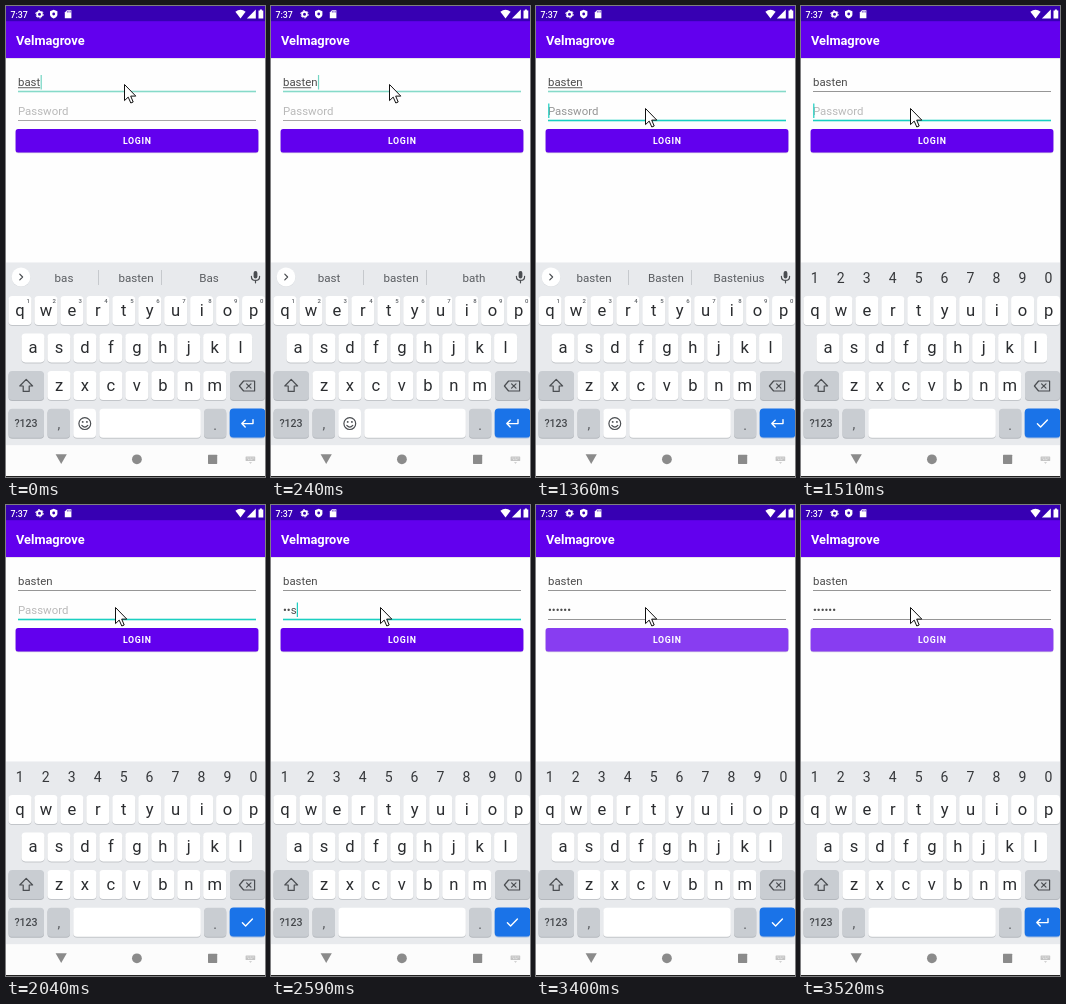
These frames come from a looping animation (259 by 471 pixels, 8 s). An HTML page:

```html
<!DOCTYPE html>
<html lang="en">
<head>
<meta charset="utf-8">
<title>Login screen</title>
<style>
  html, body { margin: 0; width: 100%; height: 100%; overflow: hidden; background: #fefefe; }
  svg { display: block; width: 259px; height: 471px; font-family: Roboto, "Liberation Sans", sans-serif; }
  text { white-space: pre; }
  .field { font-size: 11.4px; fill: #4c4c4c; }
  .word { font-size: 11.6px; fill: #5a5d61; text-anchor: middle; }
  .letter { font-size: 16.6px; fill: #2b2d30; text-anchor: middle; }
  .digit { font-size: 14px; fill: #36383b; text-anchor: middle; }
  .sup { font-size: 6px; font-weight: 500; fill: #5f6368; text-anchor: middle; }
  .dot { font-size: 14px; fill: #55585c; text-anchor: middle; }
  .icon { fill: none; stroke: #4a4d51; stroke-width: 1.2; stroke-linejoin: round; stroke-linecap: round; }
  .action { stroke: #fff; stroke-width: 1.4; }
</style>
</head>
<body>
<svg viewBox="0 0 259 471">
  <rect width="259" height="471" fill="#fefefe"/>

  <!-- app bar -->
  <rect y="52" width="259" height="1" fill="#e6e3ea"/>
  <rect y="15" width="259" height="37" fill="#6200ee"/>
  <rect width="259" height="15.2" fill="#3700b3"/>
  <text x="10" y="38.8" font-size="12.8" font-weight="700" fill="#fff">Velmagrove</text>

  <!-- status bar -->
  <g fill="#fff">
    <text x="4.5" y="11.6" font-size="8.8" font-weight="500">7:37</text>
    <circle cx="33.5" cy="8.2" r="2.4" fill="none" stroke="#fff" stroke-width="1.8"/>
    <circle cx="33.5" cy="8.2" r="3.7" fill="none" stroke="#fff" stroke-width="1" stroke-dasharray="1.9 1.97"/>
    <path d="M47.7 3.7l3.7 1.5v3q0 3-3.7 4.4q-3.7-1.4-3.7-4.4v-3z"/>
    <circle cx="47.7" cy="8" r="1.4" fill="#3700b3"/>
    <path d="M61 4.2h4.4v8h-6.6V6.5z"/>
    <path d="M61.4 5v1.6M62.9 5v1.6M64.3 5v1.6" stroke="#3700b3" stroke-width=".6"/>
    <path d="M229.4 5.8q5.1-4 10.2 0l-5.1 6.8z"/>
    <path d="M249.8 3.6v8.9h-8.9z"/>
    <path d="M252.5 4.6h1.4v-1h2v1h1.4v8h-4.8z"/>
  </g>

  <!-- form -->
  <rect id="userLine" x="12" width="238"/>
  <rect id="passLine" x="12" width="238"/>
  <text id="user" class="field" x="12" y="80.3"></text>
  <rect id="mark" x="12" y="81.3" height=".9" fill="#4c4c4c"/>
  <text id="pass" class="field" x="12" y="109.3"></text>
  <rect id="caret" width="1.2" height="14.5"/>
  <rect x="9.6" y="124.5" width="242.8" height="22.8" rx="2.5" fill="#d3cddd"/>
  <rect id="button" x="9.6" y="123" width="242.8" height="23.5" rx="2.5"/>
  <text x="131.3" y="138.2" font-size="8.8" font-weight="700" letter-spacing=".7" text-anchor="middle" fill="#fff">LOGIN</text>

  <!-- keyboard -->
  <rect y="256.5" width="259" height="183" fill="#e8eaed"/>
  <g id="strip">
    <circle cx="15" cy="271.6" r="9.5" fill="#d5d8dc"/>
    <circle cx="15" cy="271" r="9.4" fill="#fff"/>
    <path class="icon" d="M13.8 268.2l2.8 2.8-2.8 2.8"/>
    <path d="M92.5 264v15M155.5 264v15" stroke="#c6c9cd"/>
    <text class="word" x="58" y="275.8"></text>
    <text class="word" x="130" y="275.8"></text>
    <text class="word" x="203" y="275.8"></text>
    <rect x="247.6" y="265" width="3.8" height="7.4" rx="1.9" fill="#4a4d51"/>
    <path class="icon" d="M245.4 270.4q0 4 4.1 4t4.1-4M249.5 274.6v2.2"/>
  </g>
  <g id="digits"></g>
  <g id="keys"></g>
  <g id="sups"></g>
  <path class="icon" d="M20.2 373.4l6.4 6.6h-3.4v5.4h-6V380h-3.4z"/>
  <path class="icon" d="M233.4 380l4.2-5h11v10h-11zM240.6 377.8l4.4 4.4M245 377.8l-4.4 4.4"/>
  <text x="20" y="421.4" font-size="10.6" font-weight="500" text-anchor="middle" fill="#45484c">?123</text>
  <text class="dot" x="53" y="423">,</text>
  <text class="dot" x="209" y="423.6">.</text>
  <g id="emoji">
    <circle class="icon" cx="78.8" cy="417.6" r="5.9"/>
    <path class="icon" d="M75.8 419.4q3 3.4 6 0"/>
    <circle cx="76.7" cy="415.9" r=".95" fill="#4a4d51"/>
    <circle cx="80.9" cy="415.9" r=".95" fill="#4a4d51"/>
  </g>
  <path id="enter" class="icon action" d="M247 413.6v4h-11M239.2 414.2l-3.4 3.4 3.4 3.4"/>
  <path id="check" class="icon action" d="M236.4 417.8l3.2 3.2 6.8-7"/>

  <!-- navigation bar -->
  <rect y="439.3" width="259" height="31" fill="#fcfcfc"/>
  <rect y="470" width="259" height="1" fill="#222"/>
  <g fill="#8b8b8b">
    <path d="M49.6 448.2h11.2l-5.6 9.8z"/>
    <circle cx="130.9" cy="453.3" r="4.9"/>
    <rect x="202" y="448.7" width="9.2" height="9.2" rx=".6"/>
    <rect x="239.6" y="450.4" width="9.6" height="4.6" rx=".6" fill="#c4c4c4"/>
    <path d="M240.8 452h7.4M242 453.6h5" stroke="#fcfcfc" stroke-width=".6" stroke-dasharray="1 .6"/>
    <path d="M243 456.2h3l-1.5 1.6z" fill="#c4c4c4"/>
  </g>

  <path id="pointer" d="M.5 .5V16.6L4.2 13.1 6.8 19 9.2 18 6.7 12.1H11.8Z" fill="#fff" stroke="#111" stroke-width="1" stroke-linejoin="round"/>
</svg>
<script>
const LOOP = 8000;
const $ = id => document.getElementById(id);

function add(parent, tag, attrs, text) {
  const el = document.createElementNS("http://www.w3.org/2000/svg", tag);
  for (const k in attrs) el.setAttribute(k, attrs[k]);
  if (text) el.textContent = text;
  return parent.appendChild(el);
}

function key(x, y, w, fill = "#fff", shade = "#c3c6ca") {
  const group = add($("keys"), "g", {});
  const box = { x, width: w, height: 29, rx: 3.8 };
  add(group, "rect", { ...box, y: y + 1, fill: shade });
  add(group, "rect", { ...box, y, fill });
  return group;
}

const PITCH = 25.95, GRAY = "#c9cdd2", DARK = "#b4b8bd";
const rows = [["qwertyuiop", 14, 290], ["asdfghjkl", 27, 327.4], ["zxcvbnm", 53, 365]];
for (const [letters, x0, y] of rows) {
  [...letters].forEach((ch, i) => {
    const x = x0 + i * PITCH;
    key(x - 11.5, y, 23);
    add($("keys"), "text", { class: "letter", x, y: y + 19.6 }, ch);
  });
}
[..."1234567890"].forEach((d, i) => {
  add($("digits"), "text", { class: "digit", x: 13.8 + i * PITCH, y: 277 }, d);
  add($("sups"), "text", { class: "sup", x: 22.2 + i * PITCH, y: 297 }, d);
});
key(2.5, 365, 35.5, GRAY, DARK);
key(224, 365, 35, GRAY, DARK);
key(2.5, 402.8, 35.5, GRAY, DARK);
key(41.5, 402.8, 22.5, GRAY, DARK);
const emojiKey = key(67.3, 402.8, 22.7);
const space = key(93.3, 402.8, 101.5);
const wideSpace = key(67.3, 402.8, 127.5);
key(198, 402.8, 22.3, GRAY, DARK);
key(223.7, 402.6, 35.6, "#1a73e8", "#a9bfe0");

// Each step holds only what changes at that time.
const NAME = "basten", DOT = "\u2022";
const steps = [
  [0, { user: "bast", marked: 4, pass: "", hint: "#b9b9b9", words: ["bas", NAME, "Bas"],
        caret: "user", focus: "user", pos: [118, 78], secret: false, done: false, enter: true }],
  [120, { user: "baste", marked: 5, words: ["bast", NAME, "bath"] }],
  [240, { user: NAME }],
  [390, { words: ["baste", NAME, "Basten"] }],
  [540, { marked: 6, words: [NAME, "Basten", "Bastenius"] }],
  [940, { caret: "" }],
  [1090, { pos: [115, 88] }],
  [1240, { pos: [109, 102] }],
  [1360, { focus: "both", caret: "pass", hint: "#959595" }],
  [1510, { focus: "pass", marked: 0, hint: "#b9b9b9", secret: true, enter: false }],
  [2040, { caret: "" }],
  ...[2290, 2440, 2590, 2740, 2870, 3000].map((t, i) =>
    [t, { caret: "pass", pass: DOT.repeat(i) + NAME[i] }]),
  [3400, { pass: DOT.repeat(6), caret: "", focus: "", done: true }],
  [3520, { enter: true }]
];

const set = (el, attrs) => { for (const k in attrs) el.setAttribute(k, attrs[k]); };
const show = (el, on) => { el.style.display = on ? "" : "none"; };
const words = document.querySelectorAll(".word");

function line(el, y, focused, color, rest) {
  set(el, { y: focused ? y - .3 : y, height: focused ? 1.6 : 1, fill: focused ? color : rest });
}

function draw(t) {
  const s = Object.assign({}, ...steps.filter(([at]) => at <= t).map(step => step[1]));
  const user = $("user"), pass = $("pass"), caret = $("caret");

  user.textContent = s.user;
  pass.textContent = s.pass || "Password";
  pass.style.fill = s.pass ? "" : s.hint;
  show($("mark"), s.marked);
  if (s.marked) set($("mark"), { width: user.getSubStringLength(0, s.marked) });

  line($("userLine"), 85, s.focus === "user" || s.focus === "both", "#86dac9", "#969696");
  line($("passLine"), 114, s.focus === "pass" || s.focus === "both", "#1bcfc1", s.done ? "#969696" : "#a6a6a6");

  show(caret, s.caret);
  if (s.caret === "user") {
    set(caret, { x: 12.4 + user.getComputedTextLength(), y: 69, fill: "#74d5c3" });
  } else if (s.caret) {
    set(caret, { x: 12.2 + (s.pass ? pass.getComputedTextLength() : 0), y: 97.5, fill: "#1bcfc1" });
  }

  words.forEach((el, i) => { el.textContent = s.words[i]; });
  for (const el of [$("strip"), $("sups"), $("emoji"), emojiKey, space]) show(el, !s.secret);
  for (const el of [$("digits"), wideSpace]) show(el, s.secret);
  show($("enter"), s.enter);
  show($("check"), !s.enter);
  set($("button"), { fill: s.done ? "#883df1" : "#6200ee" });
  set($("pointer"), { transform: `translate(${s.pos})` });
}

let start;
function tick(now) {
  start ??= now;
  draw((now - start) % LOOP);
  requestAnimationFrame(tick);
}
draw(0);
requestAnimationFrame(tick);
</script>
</body>
</html>
```
